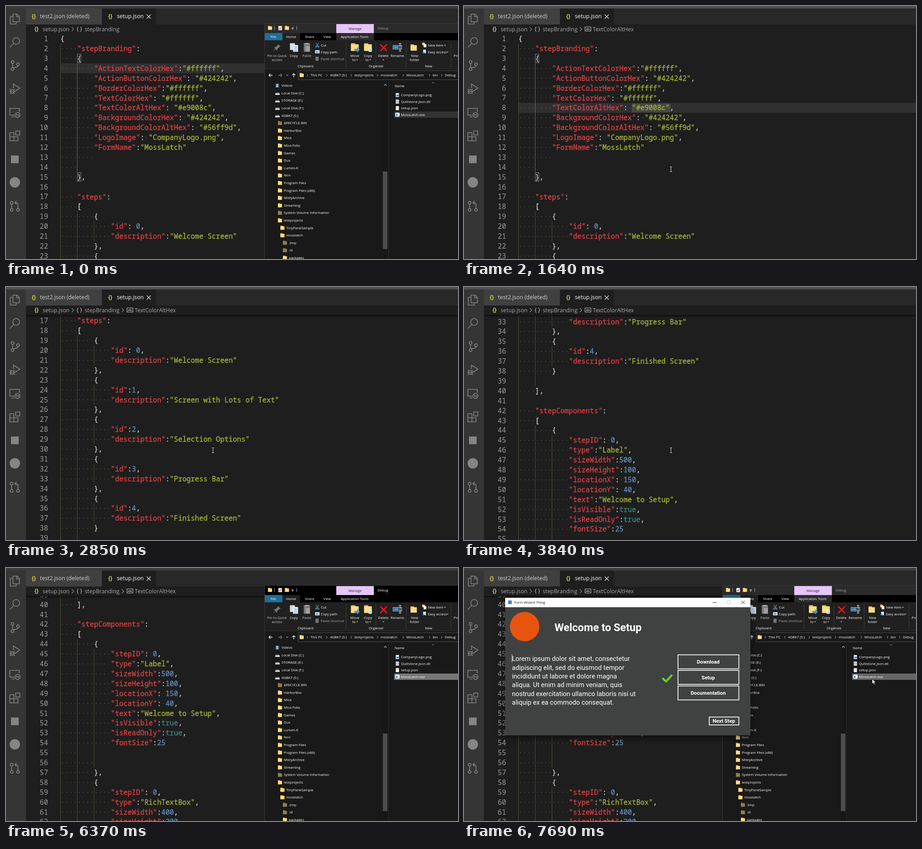
These frames come from a looping animation (999x561 px, 8000 ms). An HTML page with a canvas:

```html
<!DOCTYPE html>
<html lang="en">
<head>
<meta charset="utf-8">
<title>Setup editor</title>
<style>
html, body { margin: 0; width: 100%; height: 100%; overflow: hidden; background: #1e1e1e; }
canvas { display: block; width: 999px; height: 561px; }
</style>
</head>
<body>
<canvas id="stage" width="999" height="561"></canvas>
<script>
const ctx = document.getElementById('stage').getContext('2d');
const W = 999, H = 561, LOOP = 8000;
const UI = '"Open Sans", "Noto Sans", sans-serif';
const MONO = '"Noto Sans Mono", "DejaVu Sans Mono", monospace';
const FORM = 'Roboto, sans-serif';
const CHAR = 9.3, LINE = 21.9, LEFT = 120, NOTCH = 49.74;

const code = `{
    "stepBranding":
    {
        "ActionTextColorHex":"#ffffff",
        "ActionButtonColorHex": "#424242",
        "BorderColorHex":"#ffffff",
        "TextColorHex": "#ffffff",
        "TextColorAltHex": "#e9008c",
        "BackgroundColorHex": "#424242",
        "BackgroundColorAltHex": "#56ff9d",
        "LogoImage": "CompanyLogo.png",
        "FormName":"MossLatch"
${' '.repeat(8)}
${' '.repeat(4)}
    },

    "steps":
    [
        {
            "id": 0,
            "description":"Welcome Screen"
        },
        {
            "id":1,
            "description":"Screen with Lots of Text"
        },
        {
            "id":2,
            "description":"Selection Options"
        },
        {
            "id":3,
            "description":"Progress Bar"
        },
        {
            "id":4,
            "description":"Finished Screen"
        }

    ],

    "stepComponents":
    [
        {
            "stepID": 0,
            "type":"Label",
            "sizeWidth":500,
            "sizeHeight":100,
            "locationX": 150,
            "locationY": 40,
            "text":"Welcome to Setup",
            "isVisible":true,
            "isReadOnly":true,
            "fontSize":25
${' '.repeat(4)}
${' '.repeat(8)}
        },
        {
            "stepID": 0,
            "type":"RichTextBox",
            "sizeWidth":400,
            "sizeHeight":200,`.split('\n');

const indentOf = s => s.search(/\S/) / 4;
// Blank lines take their guides from the nearest written lines around them.
const guides = code.map((s, i) => {
  if (s.trim()) return indentOf(s);
  const above = indentOf(code.slice(0, i).reverse().find(v => v.trim()));
  const below = indentOf(code.slice(i).find(v => v.trim()));
  return above === below ? above : Math.min(above, below) + 1;
});

// [time, wheel notches]
const scrollSteps = [[0, 0], [1860, 1], [1980, 2], [2200, 3], [2310, 5], [2420, 6], [2850, 7],
  [3070, 9], [3190, 11], [3620, 12], [3730, 13], [3840, 14], [3950, 16], [4060, 17]];

// [time, x, y]; no position means the pointer is outside the picture
const pointerSteps = [[0], [210, 822, 492], [320, 755, 428], [430, 650, 345], [540, 545, 275],
  [660, 462, 232], [770, 424, 221], [1100, 426, 232], [1210, 432, 262], [1320, 441, 300],
  [1430, 449, 332], [1540, 455, 353], [1640, 457, 362], [5260, 466, 409], [5370, 469, 455],
  [5480, 472, 509], [5600], [6920, 925, 350], [7030, 914, 310], [7140, 906, 268], [7250, 902, 246]];

const stepAt = (steps, t) => steps.filter(s => s[0] <= t).pop();

function rect(x, y, w, h, color) {
  ctx.fillStyle = color;
  ctx.fillRect(x, y, w, h);
}
function box(x, y, w, h, color, width = 1) {
  ctx.strokeStyle = color;
  ctx.lineWidth = width;
  ctx.strokeRect(x, y, w, h);
}
function path(d, color, width = 1, x = 0, y = 0, fill = false) {
  ctx.save();
  ctx.translate(x, y);
  ctx.strokeStyle = ctx.fillStyle = color;
  ctx.lineWidth = width;
  if (fill) ctx.fill(new Path2D(d));
  else ctx.stroke(new Path2D(d));
  ctx.restore();
}
function disc(x, y, r, color) {
  ctx.fillStyle = color;
  ctx.beginPath();
  ctx.arc(x, y, r, 0, 7);
  ctx.fill();
}
function text(s, x, y, size, color, { font = UI, weight = 400, align = 'left' } = {}) {
  ctx.font = `${weight} ${size}px ${font}`;
  ctx.textAlign = align;
  ctx.fillStyle = color;
  ctx.fillText(s, x, y + size * 0.36);
}

const circle = (x, y, r) => `M${x + r} ${y}a${r} ${r} 0 1 1 ${-2 * r} 0a${r} ${r} 0 1 1 ${2 * r} 0`;
const sideIcons = [
  [29, 'M8 1h9l5 5v12H8zM16 1v6h6M8 6H2v17h13v-5'],
  [81, circle(15, 8.5, 7.5) + 'M9.5 14L1 23'],
  [132, circle(7, 4, 3) + circle(19, 9, 3) + circle(7, 20, 3) + 'M7 7v10M19 12c0 4-5 4-11 5'],
  [184, 'M9 10V1l14 9-10 7' + circle(6.5, 17.5, 4) + 'M2.5 17.5h8M1 12l3 3M12 12l-3 3M1 23l3-3M12 23l-3-3M0 17.5h2M11 17.5h2'],
  [236, 'M11 18H1V3h21v7M5 22h6' + circle(18, 17.5, 5.5) + 'M15 15l2 2-2 2M21 16l-2 2 2 2'],
  [288, 'M1 5h9v9H1zM1 14h9v9H1zM10 14h9v9h-9zM14 1h9v9h-9z'],
  [444, circle(5, 4, 3) + circle(5, 20, 3) + circle(19, 20, 3) + 'M5 7v10M19 17V8c0-3-2-4-7-4M16 0l-4 4 4 4']
];

function drawCodeLine(s, y) {
  const tokens = /("[^"]*")(?=:)|("[^"]*")|(\d+)|(true)|(\S)|( )/g;
  const colors = ['#d63f42', '#9fae38', '#6089b4', '#408080', '#c5c8c6', '#505037'];
  ctx.font = `400 15.5px ${MONO}`;
  ctx.textAlign = 'left';
  ctx.lineWidth = 0.4;
  for (const m of s.matchAll(tokens)) {
    const color = colors[m.slice(1).findIndex(Boolean)];
    [...m[0]].forEach((ch, i) => {
      const x = LEFT + (m.index + i) * CHAR;
      if (ch === ' ') return rect(x + 4, y - 0.5, 1.6, 1.6, '#5a5a42');
      ctx.fillStyle = ctx.strokeStyle = color;
      ctx.fillText(ch, x, y + 5.6);
      ctx.strokeText(ch, x, y + 5.6);
    });
  }
}

function drawEditor(t) {
  const clicked = t >= 990;
  const scroll = stepAt(scrollSteps, t)[1] * NOTCH;
  const lineY = n => 72.5 + (n - 1) * LINE - scroll;
  rect(0, 0, W, H, '#1e1e1e');

  ctx.save();
  ctx.beginPath();
  ctx.rect(44, 62, W, H);
  ctx.clip();
  const current = clicked ? 8 : 4;
  rect(LEFT, lineY(current) - 11, W, 22, '#303030');
  if (t >= 1210) rect(370.5, lineY(8) - 10, 86, 20, '#474747');
  code.forEach((s, i) => {
    const y = lineY(i + 1);
    if (y < 40 || y > H + 20) return;
    for (let g = 0; g < guides[i]; g++) {
      const active = g === 1 && i >= 3 && i <= 13;
      rect(Math.round(LEFT + g * 4 * CHAR), y - LINE / 2, 1, LINE, active ? '#707057' : '#505037');
    }
    text(i + 1, 93, y, 15.5, '#9c9c9c', { font: MONO, align: 'right' });
    drawCodeLine(s, y);
  });
  for (const n of [3, 15]) box(157.5, lineY(n) - 9.5, 8, 19, '#888888');
  if (scroll) {
    const shade = ctx.createLinearGradient(0, 62, 0, 67);
    shade.addColorStop(0, 'rgba(0,0,0,.55)');
    shade.addColorStop(1, 'rgba(0,0,0,0)');
    rect(44, 62, W, 5, shade);
  }
  ctx.restore();

  rect(44, 5, W, 36, '#282828');
  rect(44, 5, 168, 36, '#404040');
  rect(212, 5, 119, 36, '#1e1e1e');
  const json = (x, y, color) => text('{}', x, y, 11.5, color, { weight: 700 });
  json(57, 22.5, '#d6d645');
  text('test2.json (deleted)', 75, 23, 12.3, '#d0d0d0');
  json(226, 22.5, '#d6d645');
  text('setup.json', 245, 23, 12.3, '#ffffff');
  path('M311 19l9 9M320 19l-9 9', '#e4e4e4', 1.3);

  const crumb = '#a9a9a9', chevron = 'M0 0l4 4.5-4 4.5';
  json(63, 51, '#d6d645');
  text('setup.json', 81, 52, 12.3, crumb);
  path(chevron, crumb, 1.1, 145.5, 47);
  text('{ }', 156, 51, 12, '#cccccc');
  text('stepBranding', 174, 52, 12.3, crumb);
  if (clicked) {
    path(chevron, crumb, 1.1, 256, 47);
    box(267.5, 46.5, 13, 9, '#cccccc');
    text('abc', 274, 51, 5.5, '#cccccc', { weight: 700, align: 'center' });
    text('TextColorAltHex', 284.5, 52, 12.2, crumb);
  }

  rect(0, 5, 44, H, '#353535');
  for (const [y, d] of sideIcons) path(d, '#858585', 1.6, 7.5, y - 12);
  rect(11, 331.5, 17, 17, '#858585');
  disc(19.5, 391, 11.5, '#858585');
  rect(0, 0, W, 5.5, clicked && t < 6370 ? '#505050' : '#3c3c3c');
}

function folder(x, y, s = 9, dim = false) {
  const [back, front] = dim ? ['#75683f', '#8d7f52'] : ['#e0b24a', '#fbdc83'];
  rect(x - s / 2, y - s / 2, s * 0.55, s, back);
  rect(x - s / 2, y - s * 0.36, s, s * 0.86, front);
}
function page(x, y, w, h, color = '#f2f2f2') {
  rect(x - w / 2, y - h / 2, w, h, color);
}
function drive(x, y) {
  rect(x - 3, y - 1, 8, 2, '#85898c');
  rect(x - 4, y + 1, 10, 3, '#dfe3e6');
}

const places = ['Videos', 'Local Disk (C:)', 'STORAGE (E:)', 'Local Disk (F:)', '4GBK7 (S:)', '$RECYCLE.BIN',
  'HarborBox', 'Mica', 'Mica Folio', 'Games', 'Dux', 'Lumen-K', 'fern', 'Program Files',
  'Program Files (x86)', 'MistyArchive', 'Streaming', 'System Volume Information', 'testprojects',
  'TinyPaneSample', 'mosslatch', '.tmp', '.id', 'packages'];
const dimPlaces = [5, 17, 21, 22];
const crumbs = [['This PC', 673], ['4GBK7 (S:)', 716], ['testprojects', 770], ['mosslatch', 828],
  ['MossLatch', 885], ['bin', 943], ['Debug', 970]];
const files = ['CompanyLogo.png', 'Quillstone.Json.dll', 'setup.json', 'MossLatch.exe'];

function drawRibbon() {
  const small = (s, x, y, color = '#ffffff', align = 'left') => text(s, x, y, 7.75, color, { align });
  const mid = (s, x, y, color) => small(s, x, y, color, 'center');
  const caret = (x, y) => path('M-2 -1h4l-2 2z', '#dddddd', 1, x, y, true);
  rect(572, 76, W, 64, '#202020');
  for (const x of [751, 817, 884, 983]) rect(x, 80, 1, 56, '#3d3d3d');

  path('M4 -7l5 5-3 1-4 4-1 4-3-3-6 5 5-6-3-3 4-1 4-4z', '#777777', 1, 598, 92, true);
  mid('Pin to Quick', 599, 110, '#cccccc');
  mid('access', 599, 119, '#cccccc');
  page(633, 90, 11, 15, '#d5dde4');
  page(640, 94, 11, 15);
  for (let i = 0; i < 4; i++) rect(636.5, 90 + i * 3, 7, 1, '#4a90c8');
  mid('Copy', 636, 110);
  page(665, 92, 14, 19, '#777777');
  rect(661, 82, 8, 3, '#aaaaaa');
  page(667, 95, 9, 12, '#a0a0a0');
  mid('Paste', 665, 110, '#cccccc');
  path('M685 82l4 7M691 82l-4 7' + circle(685.5, 90, 1.5) + circle(690.5, 90, 1.5), '#5fa8dc', 1.1);
  small('Cut', 696, 87);
  rect(683, 98, 10, 7, '#cfe3f2');
  rect(684.5, 101, 6, 2, '#3d7fb5');
  small('Copy path', 695.5, 102);
  page(687.5, 117, 7, 9, '#777777');
  small('Paste shortcut', 695.5, 117, '#b0b0b0');
  mid('Clipboard', 662, 133);

  folder(771, 91, 17);
  path('M771 96h6v-4l6 6-6 6v-4h-6z', '#3c9be0', 1, -1, -1, true);
  mid('Move', 771, 110);
  folder(800, 91, 17);
  page(805, 97, 7, 9);
  rect(803, 95, 4, 1, '#3c9be0');
  rect(803, 98, 4, 1, '#3c9be0');
  mid('Copy', 800, 110);
  for (const x of [769, 798]) {
    mid('to', x, 119);
    caret(x + 7, 119.5);
  }
  path('M827 85l15 15M842 85l-15 15', '#e81b23', 2.6);
  mid('Delete', 834, 110);
  caret(834, 119.5);
  box(855.5, 87.5, 19, 8, '#d8e6f0');
  rect(857, 89, 11, 5, '#3c9be0');
  path('M868 83h6M871 83v17M868 100h6', '#e8e8e8', 1.2);
  mid('Rename', 865, 110);
  mid('Organize', 818, 133);

  folder(901, 92, 14);
  mid('New', 903, 110);
  mid('folder', 903, 119);
  folder(923, 84, 6);
  page(926, 88, 6, 7);
  small('New item', 932.5, 87);
  caret(970, 87.5);
  page(925, 101, 6, 8);
  rect(921, 102, 5, 3, '#3c9be0');
  small('Easy access', 932.5, 102);
  caret(976, 102.5);
  mid('New', 934, 133);
  small('Properties', 989.5, 110);
}

function drawExplorer(active, rowColor) {
  const label = (s, x, y, color = '#ffffff') => text(s, x, y, 7.75, color);
  const titleColor = active ? '#000000' : '#2b2b2b';
  rect(572, 38, W, H, '#191919');
  rect(572, 39, W, 21, titleColor);
  rect(572, 60, W, 16, '#000000');
  folder(583.5, 48.5);
  rect(593, 45, 1, 8, '#aaaaaa');
  page(606, 49, 8, 9);
  path('M603.5 49l2 2 3-4', '#c04a3a', 1.2);
  folder(621, 48.5);
  path('M631 48h5M632 50h3l-1.5 2z', '#dddddd');
  rect(642, 45, 1, 8, '#aaaaaa');
  rect(730, 40, 83, 20, '#e6c5f8');
  text('Manage', 771.5, 50, 7.75, '#222222', { align: 'center' });
  label('Debug', 821, 49, active ? '#ffffff' : '#a0a0a0');
  rect(572, 60, 39, 16, '#1d6f99');
  rect(611, 60, 39, 16, '#202020');
  rect(730, 60, 83, 16, titleColor);
  for (const [s, x] of [['File', 591], ['Home', 630], ['Share', 671], ['View', 710], ['Application Tools', 770.5]])
    text(s, x, 68, 7.75, '#ffffff', { align: 'center' });
  drawRibbon();

  rect(572, 140, W, 27, '#191919');
  rect(572, 139, W, 1, '#333333');
  path('M589 153.5h-8M584.5 150l-3.5 3.5 3.5 3.5', '#eeeeee', 1.3);
  path('M602 153.5h8M606.5 150l3.5 3.5-3.5 3.5', '#777777', 1.3);
  path('M619 152l2.5 2.5 2.5-2.5', '#cccccc');
  path('M636 158v-8M632.5 153.5l3.5-3.5 3.5 3.5', '#eeeeee', 1.3);
  box(645.5, 143.5, 360, 20, '#4d4d4d');
  folder(653.5, 153);
  for (const [s, x] of crumbs) {
    path('M0 0l2 2.5-2 2.5', '#bbbbbb', 1, x - 8, 151);
    label(s, x, 153.5);
  }

  places.forEach((s, i) => {
    const y = 176.5 + i * 16.59;
    const depth = i < 5 ? 0 : i < 19 ? 1 : i < 21 ? 2 : 3;
    const x = [609, 614, 619.5, 625][depth];
    if (i === 0) {
      page(599.5, y, 8, 9, '#4f5a66');
      page(599.5, y, 4, 7, '#9bc3e6');
    } else if (depth === 0) drive(599, y);
    else folder(x - 8.5, y, 9, dimPlaces.includes(i));
    label(s, x, y);
  });
  rect(833, 168, 11, H, '#171717');
  rect(833, 367, 10, 172, '#4d4d4d');
  path('M835.5 176.5l3-3 3 3', '#bbbbbb', 1.1);
  rect(845, 168, 1, H, '#2b2b2b');

  label('Name', 859, 177.5);
  path('M941.5 171.5l2.5-2.5 2.5 2.5', '#999999');
  rect(858, 234, W, 14, rowColor);
  files.forEach((s, i) => {
    const y = 197.5 + i * 14.5;
    page(865, y, 7, 9);
    if (i === 0) rect(863, y - 1, 5, 4, '#3d86c6');
    if (i === 1) path(circle(865, y, 2), '#777777');
    if (i === 2) rect(863, y - 2, 4, 1, '#bbbbbb');
    if (i === 3) {
      rect(860, y - 3.5, 10, 7, '#f2f2f2');
      rect(861.5, y - 1.5, 4, 4, '#3d86c6');
    }
    label(s, 873, y);
  });
  box(571.5, 38.5, 500, 600, '#3a3a3a');
}

const lorem = ['Lorem ipsum dolor sit amet, consectetur', 'adipiscing elit, sed do eiusmod tempor',
  'incididunt ut labore et dolore magna', 'aliqua. Ut enim ad minim veniam, quis',
  'nostrud exercitation ullamco laboris nisi ut', 'aliquip ex ea commodo consequat.'];
const buttons = [['Download', 472, 191.5, 136.5, 33], ['Setup', 472, 226, 136.5, 33],
  ['Documentation', 472, 260.5, 136.5, 33], ['Next Step', 541, 329.5, 67.5, 19.5]];

function drawForm() {
  ctx.save();
  ctx.shadowColor = 'rgba(0,0,0,.6)';
  ctx.shadowBlur = 16;
  ctx.shadowOffsetY = 4;
  rect(91, 66, 542, 305, '#404241');
  ctx.restore();
  rect(91, 66, 542, 21, '#ffffff');
  rect(97.5, 72, 8, 8, '#3f7fc1');
  text('Form Wizard Thing', 111, 76.5, 7.8, '#111111');
  path('M549.5 76.5h8M613 72.5l7.5 7.5M620.5 72.5l-7.5 7.5', '#222222');
  box(581.5, 72.5, 7, 7, '#cccccc');

  disc(134, 130, 32.5, '#e8540f');
  text('Welcome to Setup', 200, 131.5, 23.6, '#ffffff', { font: FORM, weight: 700 });
  rect(105.5, 191, 1, 18, '#dddddd');
  lorem.forEach((s, i) => text(s, 106, 201 + i * 19.4, 14.5, '#ffffff', { font: FORM }));
  path('M438.5 244l8 7.5 13.5-14.5', '#5fdd0d', 4.2);
  for (const [s, x, y, w, h] of buttons) {
    box(x + 1, y + 1, w - 2, h - 2, '#e2e2e2', 2);
    text(s, x + w / 2 - 0.5, y + h / 2, 11.3, '#ffffff', { font: FORM, weight: 700, align: 'center' });
  }
}

function drawPointer(t) {
  const [, x, y] = stepAt(pointerSteps, t);
  if (x === undefined) return;
  const overExplorer = x > 572 && (t < 990 || t >= 6370);
  if (!overExplorer) {
    path('M-2.5 -5.5h2l.5 .5 .5 -.5h2M0 -5v10M-2.5 5.5h2l.5 -.5 .5 .5h2', '#e0e0e0', 1, x + 0.5, y);
    return;
  }
  if (t >= 7370 && t < 7690) {
    const turn = Math.floor((t - 7370) / 105) * 1.4;
    ctx.lineWidth = 2.4;
    for (const [color, from, to] of [['#1f6fc0', 0, 7], ['#6cc0f5', turn, turn + 1.8]]) {
      ctx.strokeStyle = color;
      ctx.beginPath();
      ctx.arc(x + 8, y - 2, 4, from, to);
      ctx.stroke();
    }
  }
  const arrow = 'M0 0v11l2.6-2.4 1.8 4 2-.9-1.8-3.8h3.6z';
  path(arrow, '#ffffff', 1, x, y, true);
  path(arrow, '#000000', 0.8, x, y);
}

function draw(t) {
  drawEditor(t);
  const launched = t >= 7580;
  if (t < 990) drawExplorer(false, '#333333');
  else if (t >= 6370) drawExplorer(!launched, launched ? '#666666' : '#777777');
  if (launched) {
    ctx.globalAlpha = t < 7690 ? 0.6 : 1;
    drawForm();
    ctx.globalAlpha = 1;
  }
  drawPointer(t);
}

function tick() {
  draw(performance.now() % LOOP);
  requestAnimationFrame(tick);
}
tick();
</script>
</body>
</html>
```
